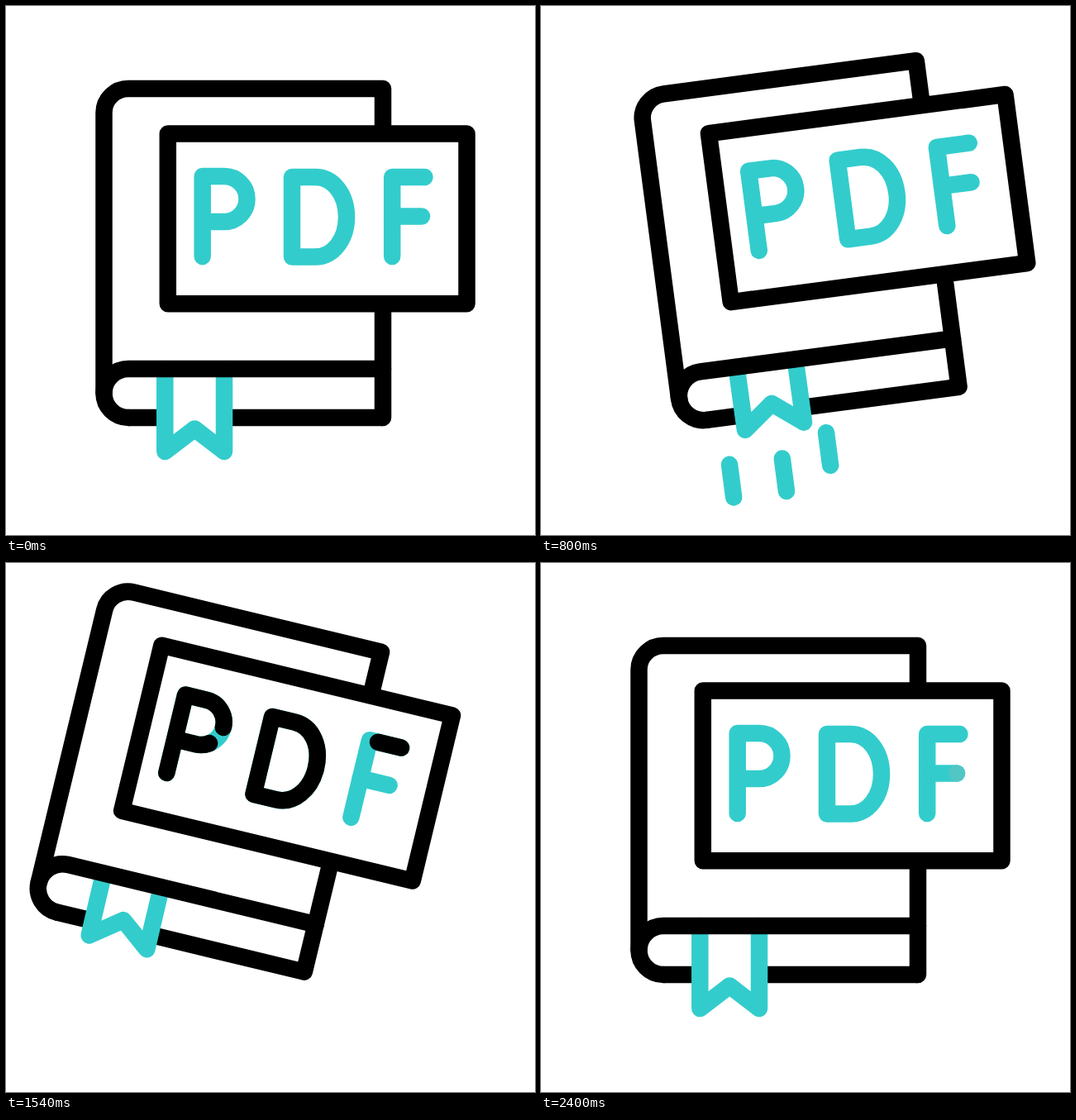
Write an HTML page that moves like this. It is 640 px wide and 640 px high and loops after 2.8 s.

```html
<!DOCTYPE html>
<html lang="en">
<head>
<meta charset="utf-8">
<title>PDF book</title>
<style>
  html, body { margin: 0; height: 100%; overflow: hidden; background: #fff; }
  svg { display: block; width: 100%; height: 100%; }
  path { fill: none; stroke: #000; stroke-width: 20.5; stroke-linecap: round; stroke-linejoin: round; }
  .teal path { stroke: #3cc; }
  .butt { stroke-linecap: butt; }
</style>
</head>
<body>
<svg viewBox="0 0 640 640">
  <g id="book">
    <path class="butt" d="M456 498H266M190 498H148"/>
    <path d="M456 100V498M148 498A29.5 29.5 0 0 1 118.5 468V129A29.5 29 0 0 1 148 100H456"/>
    <g class="teal"><path id="ribbon"/></g>
    <g class="teal" id="streaks"></g>
    <path d="M118.5 468A29.5 29.5 0 0 1 148 439H456"/>
    <path style="fill:#fff" d="M195.8 154.5H557.5V360.3H195.8Z"/>
    <g class="teal" id="letters"></g>
    <g id="ink"></g>
  </g>
</svg>
<script>
const LOOP = 2800;
const $ = id => document.getElementById(id);
const clamp = x => Math.min(1, Math.max(0, x));
const linear = x => x;
const smooth = x => (1 - Math.cos(Math.PI * x)) / 2;
const easeOut = x => 1 - (1 - x) ** 3;
const progress = (t, from, to, ease = linear) => ease(clamp((t - from) / (to - from)));

// keys: [time, value] pairs, eased between neighbours
function track(t, keys, ease = smooth) {
  let value = keys[0][1];
  for (let i = 1; i < keys.length; i++) {
    const [t0, v0] = keys[i - 1], [t1, v1] = keys[i];
    if (t >= t0) value = v0 + (v1 - v0) * progress(t, t0, t1, ease);
  }
  return value;
}

function addPath(parent, d) {
  const path = document.createElementNS("http://www.w3.org/2000/svg", "path");
  path.setAttribute("d", d);
  path.setAttribute("pathLength", 1);
  return parent.appendChild(path);
}

function trim(path, start, end) {
  path.style.display = end > start ? "" : "none";
  path.setAttribute("stroke-dasharray", `${Math.max(end - start, 0.0001)} 3`);
  path.setAttribute("stroke-dashoffset", -start);
}

// Each stroke covers the part a..b of its letter's drawing time
const strokes = [
  { d: "M291.5 233.5A27.5 27.5 0 0 1 264 261H237.7V303V206H264A27.5 27.5 0 0 1 291.5 233.5", delay: 0, a: 0, b: 1 },
  { d: "M412 255.5C412 282 396 303.5 374 303.5H346V207H374C396 207 412 228 412 255.5", delay: 240, a: 0, b: 1 },
  { d: "M506.5 207H467.2V303", delay: 520, a: 0, b: 0.79 },
  { d: "M467.2 254.5H503", delay: 520, a: 0.79, b: 1, last: true }
];
for (const s of strokes) {
  addPath($("letters"), s.d);
  s.path = addPath($("ink"), s.d);
}

const streaks = [[168.5, 555], [232.7, 556], [289.5, 532]]
  .map(([x, y]) => addPath($("streaks"), `M${x} ${y}v40`));

function draw(t) {
  const angle = track(t, [[540, 0], [1040, -14], [1400, 16], [1477, 16], [1824, -14], [2240, 0]]);
  const lift = t < 1500
    ? track(t, [[538, 0], [935, -24.4]], linear)
    : track(t, [[1824, -24.4], [2240, 0]]);
  $("book").setAttribute("transform", `translate(0 ${lift}) rotate(${angle} 320 108)`);

  const drop = track(t, [[80, 0], [420, 38.5], [460, 38.5], [760, -23], [1630, -23], [1830, 0]]);
  const dx = -drop / 55, y = 539 + drop;
  $("ribbon").setAttribute("d",
    `M192.3 439L${192.3 + dx} ${y}L${228.2 + dx} ${y - 27.5}L${264 + dx} ${y}L264 439`);

  for (const s of streaks)
    trim(s, progress(t, 840, 940, smooth), progress(t, 660, 760, smooth));

  for (const { path, delay, a, b, last } of strokes) {
    const local = x => clamp((x - a) / (b - a));
    const end = local(progress(t - delay, 964, 1301));
    const start = local(progress(t - delay, 1530, 1865, easeOut));
    trim(path, last ? Math.min(start, 0.999) : start, end);
    path.style.stroke = last && t >= 2400 ? "#52c5c5" : "#000";
  }
}

function frame() {
  draw(performance.now() % LOOP);
  requestAnimationFrame(frame);
}
frame();
</script>
</body>
</html>
```
